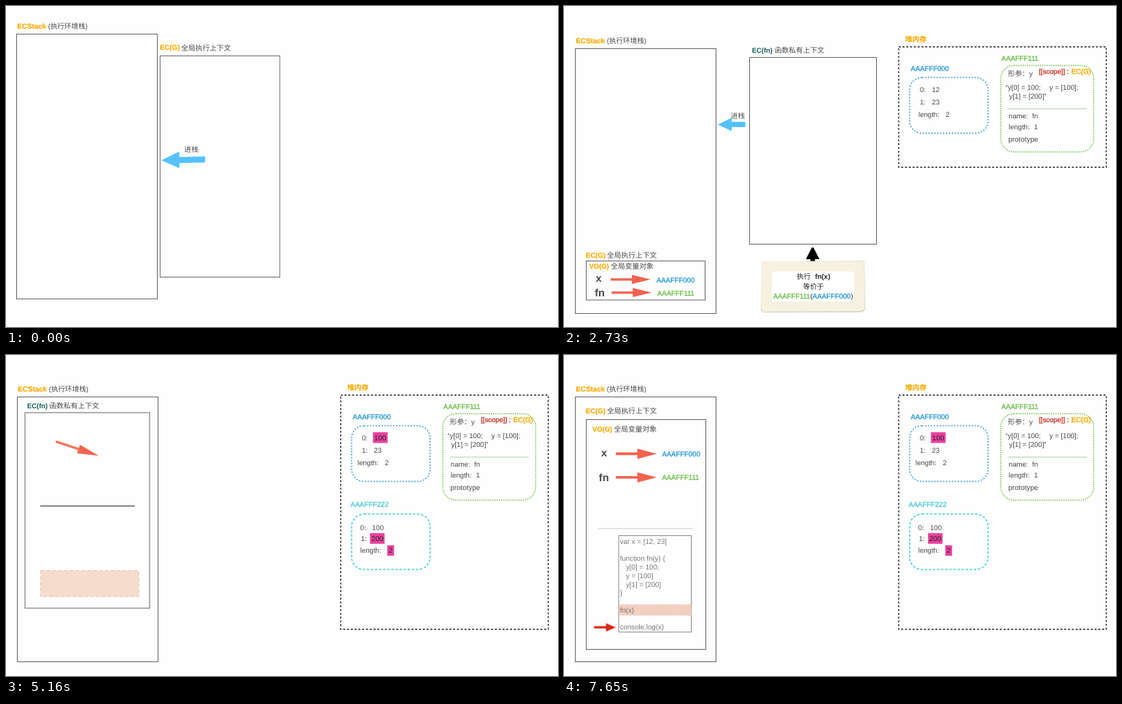
An HTML page that plays this animation: 757x440 px, repeating every 7.75 s.

```html
<!DOCTYPE html>
<html lang="zh">
<head>
<meta charset="utf-8">
<title>执行环境栈</title>
<style>
html, body { margin: 0; width: 100%; height: 100%; overflow: hidden; background: #fefefe; }
svg { display: block; width: 757px; height: 440px; }
text { font: 9.6px "Liberation Sans", "Noto Sans CJK SC", "Noto Sans CJK", sans-serif; fill: #484848; white-space: pre; text-rendering: geometricPrecision; }
.b { font-weight: 700; }
.or { fill: #f7aa00; }
.or.b { stroke: #f7aa00; stroke-width: .2; }
.teal { fill: #135e57; }
.blue { fill: #1590d2; }
.green { fill: #62b93e; }
.cyan { fill: #3fc8cf; }
.red { fill: #c5301f; }
.addr { font-size: 9.5px; stroke-width: .25; }
.addr.blue { stroke: #1590d2; }
.addr.green { stroke: #62b93e; }
.addr.cyan { stroke: #3fc8cf; }
.var { font-size: 14.5px; font-weight: 700; }
.wide { font-size: 9.75px; }
.code text { font-size: 9.7px; fill: #777; }
.box { fill: none; stroke: #666; stroke-width: 1; }
.white { fill: #fefefe; }
.pink { fill: #e9429e; }
.hot { fill: #222; }
.dots { fill: none; stroke-width: 1.6; }
.border { stroke: #222; stroke-width: 1.4; stroke-dasharray: 2.8 2.4; }

/* One shared 7.75 s clock */
.a { animation: 7.75s linear infinite both; }
.stack { animation-name: stack; animation-timing-function: ease-in-out; }
.first { animation-name: first; }
.slide { animation-name: slide; animation-timing-function: ease-in-out; }
.firstPush { animation-name: firstPush; }
.global { animation-name: global; }
.pointer { animation-name: pointer; animation-timing-function: ease-in-out; }
.call { animation-name: call; }
.enter { animation-name: enter; animation-timing-function: ease-in-out; }
.heap { animation-name: heap; }
.grow { animation-name: grow; animation-timing-function: ease-in-out; }
.row { animation-name: row; }
.old { animation-name: old; }
.write { animation-name: write; }
.copy { animation-name: copy; }
.rewrite { animation-name: rewrite; }
.run { animation-name: run; }
.leave { animation-name: leave; animation-timing-function: ease-in; }
.body { animation-name: body; }

@keyframes stack {
  0%, 10.71% { transform: none; }
  14.19%, 45.68% { transform: translate(1px, 20px); }
  47.74%, 100% { transform: translate(1px, 19px); }
}
@keyframes slide { 0%, .65% { transform: translateX(183.3px); } 8.9%, 100% { transform: none; } }
@keyframes first { 0%, 10.71% { opacity: 1; } 14.19%, 100% { opacity: 0; } }
@keyframes firstPush { 0%, 8.9% { opacity: 1; } 12.9%, 100% { opacity: 0; } }
@keyframes global {
  0%, 10.71% { opacity: 0; transform: translateY(1px); }
  15.48%, 25.03% { opacity: 1; transform: translateY(1px); }
  26.3%, 78.06% { opacity: 0; transform: none; }
  80%, 100% { opacity: 1; transform: none; }
}
@keyframes pointer { 0%, 89.68% { transform: none; } 94.19%, 100% { transform: translate(1.5px, 23.6px); } }
@keyframes call { 0%, 25.03% { opacity: 0; } 26.3%, 45.68% { opacity: 1; } 47.74%, 100% { opacity: 0; } }
@keyframes enter { 0%, 35.23% { transform: none; } 42.4%, 100% { transform: translate(-231px, 3px); } }
@keyframes heap {
  0%, 12.9% { opacity: 0; transform: translate(-30px, 1px); }
  15.48%, 25.03% { opacity: 1; transform: translate(-30px, 1px); }
  26.3%, 45.68% { opacity: 1; transform: translateY(1px); }
  47.74%, 100% { opacity: 1; transform: none; }
}
@keyframes grow { 0%, 45.68% { height: 165px; } 50.32%, 100% { height: 321px; } }
@keyframes row { 0%, 45.68% { transform: translateX(4px); } 47.74%, 100% { transform: none; } }
@keyframes old { 0%, 50.32% { opacity: 1; } 51.61%, 100% { opacity: 0; } }
@keyframes write { 0%, 50.32% { opacity: 0; } 51.61%, 100% { opacity: 1; } }
@keyframes copy { 0%, 52% { opacity: 0; } 54.19%, 100% { opacity: 1; } }
@keyframes rewrite { 0%, 58.06% { opacity: 0; } 59.35%, 100% { opacity: 1; } }
@keyframes run { 0%, 45.68% { opacity: 0; } 47.74%, 73.55% { opacity: 1; } 76.13%, 100% { opacity: 0; } }
@keyframes leave { 0%, 67.74% { transform: none; } 75.5%, 100% { transform: translateX(228px); } }
@keyframes body { 0%, 50.32% { opacity: 0; } 52.5%, 100% { opacity: 1; } }
</style>
</head>
<body>
<svg viewBox="0 0 757 440">
  <defs>
    <path id="arrow" d="M0-1.6H29V-6.3L55 0L29 6.3V1.6H0Z" fill="#f2634f"/>
  </defs>

  <g class="a stack">
    <rect class="box" x="14.5" y="38.5" width="193" height="363"/>
    <text class="or b" x="15.3" y="30.5" style="font-size:9.8px">ECStack</text>
    <text x="57.7" y="30.5">(执行环境栈)</text>
  </g>

  <g class="a first">
    <g class="a slide">
      <rect class="box white" x="28" y="68.3" width="164.4" height="303.4"/>
      <text class="or b" x="27.7" y="60.4">EC(G)</text>
      <text class="wide" x="57" y="60.5">全局执行上下文</text>
    </g>
  </g>
  <g class="a firstPush">
    <path d="M213 211.6L237.7 199.6V206.9L273 206.2V214.4L237.7 215.2V222.3Z" fill="#55c1ff"/>
    <text x="244.6" y="200.4">进栈</text>
  </g>

  <!-- Global context, expanded -->
  <g class="a global">
    <text class="or b" x="29.8" y="80.3">EC(G)</text>
    <text class="wide" x="59" y="80.3">全局执行上下文</text>
    <rect class="box" x="30.5" y="88.5" width="164" height="315"/>
    <text class="or b" x="39" y="104.6" style="font-size:9.4px">VO(G)</text>
    <text class="wide" x="68.5" y="104.6">全局变量对象</text>
    <text class="var" x="51" y="139">x</text>
    <text class="var" x="47.8" y="173">fn</text>
    <use href="#arrow" transform="translate(71 135.4) scale(1.02 1.12)"/>
    <use href="#arrow" transform="translate(71 167.8) scale(1.02 1.12)"/>
    <text class="addr blue" x="134.4" y="139">AAAFFF000</text>
    <text class="addr green" x="134.4" y="171">AAAFFF111</text>
    <path d="M47 238H176" stroke="#bbb" stroke-width=".8"/>
    <g class="code">
      <rect class="box white" x="75" y="247.6" width="99.6" height="132.2" style="stroke:#888"/>
      <rect x="75.5" y="342.3" width="99" height="14.4" fill="#f3cfbf" stroke="#dfb5a4" stroke-width=".6" stroke-dasharray="3 2"/>
      <text x="76.7" y="259">var x = [12, 23]</text>
      <text x="76.7" y="282.4">function fn(y) {</text>
      <text x="85" y="294.1">y[0] = 100;</text>
      <text x="85" y="305.8">y = [100]</text>
      <text x="85" y="317.5">y[1] = [200]</text>
      <text x="76.7" y="329.3">}</text>
      <text x="76.7" y="352.8">fn(x)</text>
      <text x="76.7" y="376.4">console.log(x)</text>
    </g>
    <path class="a pointer" d="M39.7 348.1H56V344L69.6 349.7L56 355.4V351.3H39.7Z" fill="#d8281b"/>
  </g>

  <!-- Function call: collapsed global context and the pushed frame -->
  <g class="a call">
    <text class="or b" x="29.8" y="345.1">EC(G)</text>
    <text class="wide" x="59" y="345.1">全局执行上下文</text>
    <rect class="box" x="30.5" y="349.5" width="163" height="53.5"/>
    <text class="or b" x="34.6" y="360.4" style="font-size:9.4px">VO(G)</text>
    <text class="wide" x="64.3" y="360.4">全局变量对象</text>
    <text class="var" x="43.6" y="378.4">x</text>
    <text class="var" x="42.2" y="397.6">fn</text>
    <use href="#arrow" x="64" y="374.8"/>
    <use href="#arrow" x="65.3" y="392.8"/>
    <text class="addr blue" x="126.9" y="378.6">AAAFFF000</text>
    <text class="addr green" x="128" y="396.6">AAAFFF111</text>

    <path d="M211 162.4L230 153.2V158.8H248.6V165.9H230V171.4Z" fill="#55c1ff"/>
    <text x="228.8" y="154.2">进栈</text>

    <path d="M341 329L350.3 347H344.2V352H338V347H331.7Z" fill="#000"/>
    <path d="M271.5 350.3L412 349.2L413 416L409 419.7L273 420.3L270 416.5Z" fill="#d8d2bf"/>
    <path d="M270.6 350L411.6 349.4L412.2 415L408 418.3L273 419L270.4 414Z" fill="#f6f1e0"/>
    <rect x="285" y="363.7" width="113" height="41.3" rx="5" fill="#fff"/>
    <text class="hot" x="319.2" y="374.3">执行</text>
    <text class="hot b" x="344.3" y="374.3">fn(x)</text>
    <text class="hot" x="327.7" y="387.8">等价于</text>
    <text class="hot" x="286.8" y="400.9"><tspan class="addr blue green">AAAFFF111</tspan>(<tspan class="addr blue">AAAFFF000</tspan>)</text>

    <g class="a enter">
      <rect class="white" x="249.3" y="57" width="184" height="274"/>
      <rect class="box" x="254.5" y="70.5" width="174" height="256"/>
      <text class="teal b" x="257.8" y="64.4" style="font-size:9.4px">EC(fn)</text>
      <text class="wide" x="288.8" y="64.4">函数私有上下文</text>
    </g>
  </g>

  <!-- Function context while it runs -->
  <g class="a run">
    <g class="a leave">
      <text class="teal b" x="29" y="72.6" style="font-size:9.4px">EC(fn)</text>
      <text class="wide" x="59.4" y="72.6">函数私有上下文</text>
      <rect class="box white" x="26" y="79" width="171" height="268"/>
      <g class="a body">
        <use href="#arrow" transform="translate(68.3 118.6) rotate(18.3) scale(1.13 1)"/>
        <path d="M47 207H176.5" stroke="#888" stroke-width="1.8"/>
        <rect x="47.6" y="295.6" width="134.6" height="35.6" fill="#f6dccd" stroke="#e6bfae" stroke-width=".9" stroke-dasharray="5 3"/>
      </g>
    </g>
  </g>

  <g class="a heap">
    <text class="or b wide" x="468" y="48.2">堆内存</text>
    <rect class="box border a grow" x="459" y="55" width="284.6" height="321"/>

    <text class="addr blue" x="475.6" y="87.7">AAAFFF000</text>
    <rect class="dots" x="474" y="97" width="107.6" height="76.4" rx="17" stroke="#3c9fd6" stroke-dasharray="1.8 2.2"/>
    <text x="488" y="116.7">0:</text>
    <text class="a old" x="504.5" y="116.7">12</text>
    <g class="a write">
      <rect class="pink" x="503.2" y="105.8" width="20.2" height="14.8"/>
      <text class="hot" x="505" y="116.7" style="font-size:9.8px">100</text>
    </g>
    <text x="488" y="133.9">1:</text>
    <text x="504.5" y="133.9">23</text>
    <g class="a row">
      <text x="482" y="151">length:</text>
      <text x="519.6" y="151">2</text>
    </g>

    <text class="addr green" x="599.8" y="74.2">AAAFFF111</text>
    <rect class="dots" x="599" y="80.5" width="127.4" height="118.4" rx="18" stroke="#74c14f" stroke-dasharray="1.5 1.5" style="stroke-width:1.5"/>
    <text x="608.8" y="95.2">形参：</text>
    <text x="638" y="95.2">y</text>
    <text class="red" x="651.2" y="92.2" style="font-size:9.5px;stroke:#c5301f;stroke-width:.3">[[scope]] :</text>
    <text class="or" x="695.8" y="92.2" style="font-size:9.5px;stroke:#f7aa00;stroke-width:.5">EC(G)</text>
    <text x="605.6" y="114">“y[0] = 100;</text>
    <text x="665.7" y="114">y = [100];</text>
    <text x="610.6" y="126">y[1] = [200]”</text>
    <path d="M608.5 140H717" stroke="#a9c99a" stroke-width=".9"/>
    <text x="609.8" y="152.5">name:</text>
    <text x="642" y="152.5">fn</text>
    <text x="609.8" y="168.1">length:</text>
    <text x="644.6" y="168.1">1</text>
    <text x="609.2" y="185.3" style="font-size:9.9px">prototype</text>

    <g class="a copy">
      <text class="addr cyan" x="472.4" y="208.3">AAAFFF222</text>
      <rect class="dots" x="474" y="218" width="107.6" height="76" rx="17" stroke="#45cfd5" stroke-dasharray="3.2 2.4"/>
      <text x="485.8" y="239.8">0:</text>
      <text x="502" y="239.8">100</text>
      <text x="485.8" y="270.6">length:</text>
      <g class="a rewrite">
        <rect class="pink" x="499.2" y="244.2" width="20" height="14.6"/>
        <rect class="pink" x="522.8" y="260.8" width="9.4" height="14.4"/>
        <text x="486.8" y="254.8">1:</text>
        <text class="hot" x="501" y="254.8" style="font-size:9.8px">200</text>
        <text class="hot" x="524.8" y="271.2">2</text>
      </g>
    </g>
  </g>
</svg>
</body>
</html>
```
